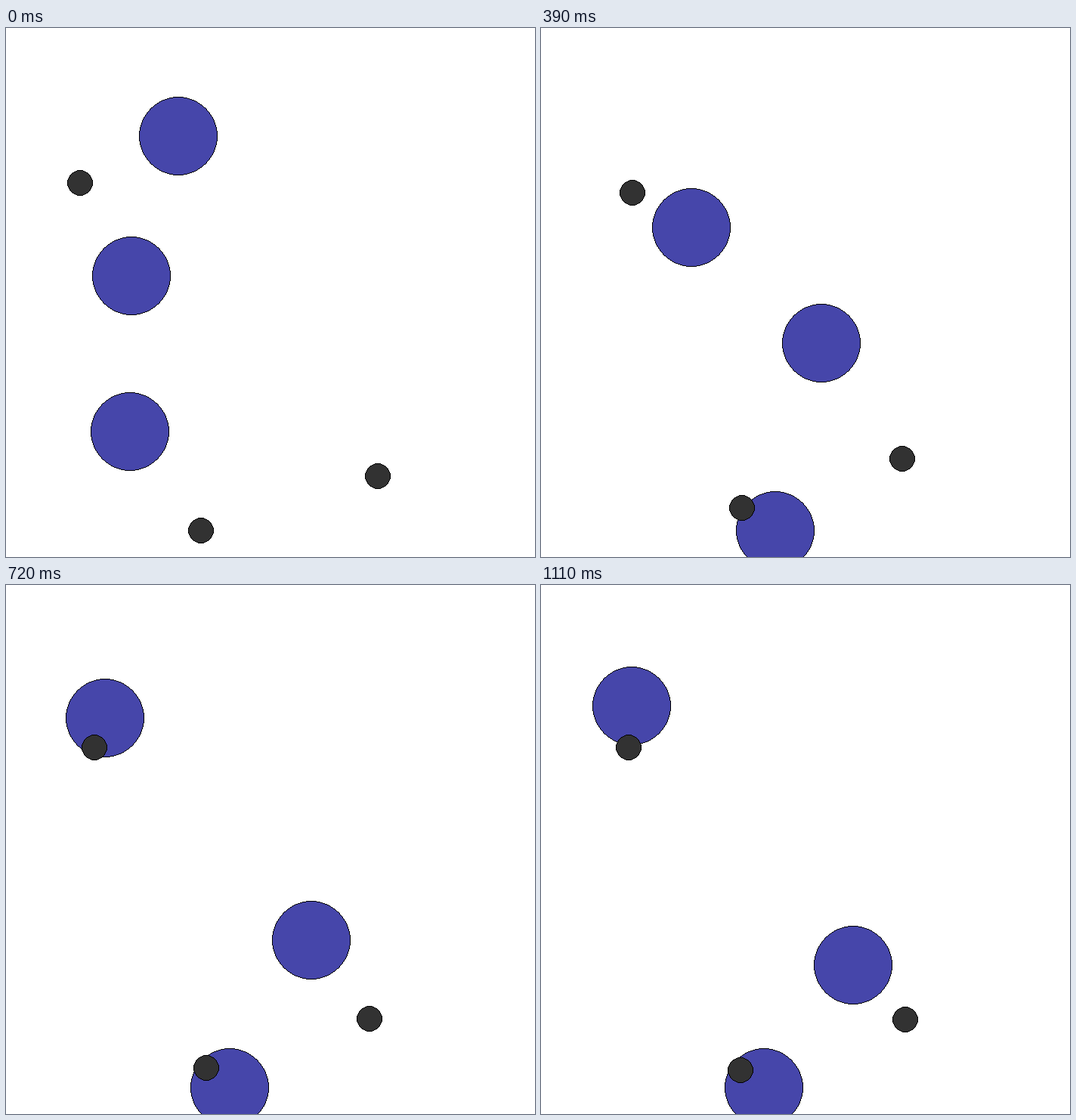
Write an HTML page with a canvas that moves like this. It is 700x700 px and loops after 1.17 s.

```html
<!DOCTYPE html>
<html lang="en">
<head>
<meta charset="utf-8">
<title>Agents and landmarks</title>
<style>
html, body { margin: 0; width: 100%; height: 100%; overflow: hidden; background: #fff; }
canvas { display: block; width: 700px; height: 700px; }
</style>
</head>
<body>
<canvas id="stage" width="700" height="700"></canvas>
<script>
const ctx = document.getElementById('stage').getContext('2d');
const MID = 350, MARGIN = 0.9, LOOP = 1170, STEPS = 25;
const THRUST = 17.54, DAMPING = 0.75;
const DIRS = { R: [1, 0], L: [-1, 0], D: [0, 1], U: [0, -1], '.': [0, 0] };

// Positions are relative to the middle; each letter is one push per step.
const agents = [
  { x: -134.4, y: -228.5, plan: 'DDR.LL.LUU' },
  { x: -203.1, y: -23.98, plan: 'RRRDRDDUDULR.D' },
  { x: -205.5, y: 205.7, plan: 'RDDRDRDUL' + 'U.D'.repeat(5) }
];
const landmarks = [
  { x: -278.9, y: -160.4 },
  { x: -101.6, y: 350 },
  { x: 158.3, y: 270.3 }
];

// Damped motion: move by the velocity, then slow down and push.
function trace({ x, y, plan }) {
  const path = [{ x, y }];
  let vx = 0, vy = 0;
  for (let i = 0; i < STEPS; i++) {
    x += vx;
    y += vy;
    const [dx, dy] = DIRS[plan[i] || '.'];
    vx = vx * DAMPING + dx * THRUST;
    vy = vy * DAMPING + dy * THRUST;
    path.push({ x, y });
  }
  return path;
}
const paths = agents.map(trace);

// Midpoint circle: one octant, mirrored into the other.
function rim(r) {
  const points = [];
  let f = 1 - r, x = 0, y = r;
  while (x < y) {
    if (f >= 0) {
      y--;
      f -= 2 * y;
    }
    x++;
    f += 2 * x + 1;
    points.push([x, y], [y, x]);
  }
  return points;
}

// Hard-edged disc with a thin black outline.
function disc(cx, cy, r, color) {
  const points = rim(r);
  ctx.fillStyle = color;
  for (const [x, y] of points) {
    ctx.fillRect(cx - x, cy - y, 2 * x, 1);
    ctx.fillRect(cx - x, cy + y - 1, 2 * x, 1);
  }
  ctx.fillStyle = '#000';
  for (const [x, y] of points) {
    for (const px of [cx - x, cx + x - 1]) {
      ctx.fillRect(px, cy - y, 1, 1);
      ctx.fillRect(px, cy + y - 1, 1, 1);
    }
  }
}

// The view zooms out so that everything stays inside the margin.
function draw(step) {
  const now = paths.map(path => path[step]);
  const reach = Math.max(...now.concat(landmarks)
    .map(p => Math.max(Math.abs(p.x), Math.abs(p.y))));
  const zoom = MID / reach;
  const place = v => Math.floor(MID + Math.floor(v * zoom + 1e-6) * MARGIN + 1e-6);

  ctx.fillStyle = '#fff';
  ctx.fillRect(0, 0, 700, 700);
  for (const p of now) disc(place(p.x), place(p.y), 52, '#4646aa');
  for (const p of landmarks) disc(place(p.x), place(p.y), 17, '#323232');
}

// Steps last 30 and 60 ms in turn.
function stepAt(t) {
  return 2 * Math.floor(t / 90) + (t % 90 >= 30 ? 1 : 0);
}

const start = performance.now();
function tick() {
  draw(Math.min(STEPS, stepAt((performance.now() - start) % LOOP)));
  requestAnimationFrame(tick);
}
tick();
</script>
</body>
</html>
```
